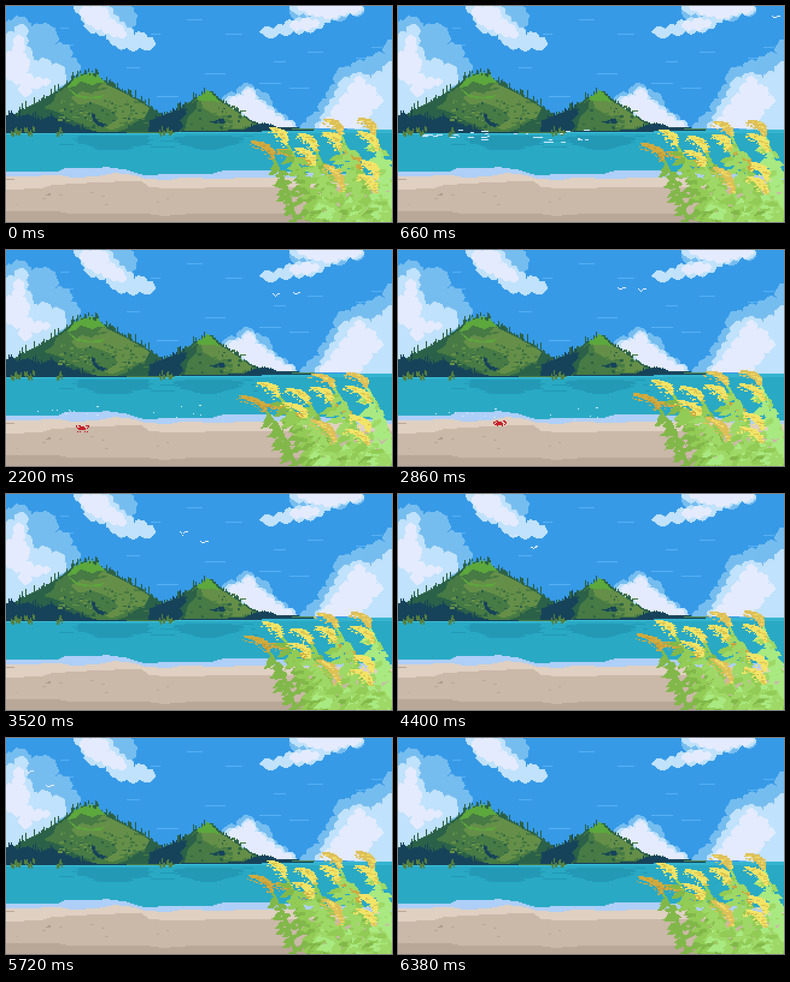
Animation, 640 px wide and 360 px high, one loop 6.6 s. Source, as an HTML page with a canvas:

```html
<!DOCTYPE html>
<html lang="en">
<head>
<meta charset="utf-8">
<title>Island beach</title>
<style>
  html, body { margin: 0; height: 100%; overflow: hidden; background: #369ae7; }
  canvas { display: block; width: 640px; height: 360px; image-rendering: pixelated; }
</style>
</head>
<body>
<canvas id="stage" width="320" height="180"></canvas>
<script>
const STEP = 220, STEPS = 30;
const stage = document.getElementById('stage').getContext('2d');
const backdrop = document.createElement('canvas');
backdrop.width = 320; backdrop.height = 180;
let ctx = backdrop.getContext('2d');

let seed = 1;
const rnd = (a = 0, b = 1) => {
  seed = (seed * 16807) % 2147483647;
  return a + (b - a) * seed / 2147483647;
};
const mix = (a, b, t) => a + (b - a) * t;
const parse = s => s.split(' ').map(p => p.split(',').map(Number));

// Coordinates are stage pixels; everything snaps to 2px cells.
function rect(color, x, y, w = 2, h = 2) {
  ctx.fillStyle = color;
  ctx.fillRect(Math.round(x / 2), Math.round(y / 2), Math.max(1, Math.round(w / 2)), Math.max(1, Math.round(h / 2)));
}

function fill(color, points) {
  const p = typeof points === 'string' ? parse(points) : points;
  const ys = p.map(q => q[1]);
  ctx.fillStyle = color;
  for (let row = Math.floor(Math.min(...ys) / 2); row <= Math.max(...ys) / 2; row++) {
    const y = row * 2 + 1, hits = [];
    p.forEach(([x0, y0], i) => {
      const [x1, y1] = p[(i + 1) % p.length];
      if ((y0 <= y) !== (y1 <= y)) hits.push(Math.round(mix(x0, x1, (y - y0) / (y1 - y0)) / 2));
    });
    hits.sort((a, b) => a - b);
    for (let i = 0; i + 1 < hits.length; i += 2) ctx.fillRect(hits[i], row, hits[i + 1] - hits[i], 1);
  }
}

// Clockwise polygon whose edges swell outwards.
function puff(color, points) {
  const p = parse(points), out = [];
  p.forEach(([x0, y0], i) => {
    const [x1, y1] = p[(i + 1) % p.length], dx = x1 - x0, dy = y1 - y0;
    const size = Math.hypot(dx, dy) < 34 ? .28 : 0;
    for (let t = 0; t < 1; t += .2) {
      const b = Math.sin(t * Math.PI) * size;
      out.push([x0 + dx * t + dy * b, y0 + dy * t - dx * b]);
    }
  });
  fill(color, out);
}

// Small trees standing on a ridge line.
function trees(color, ridge, height) {
  const p = parse(ridge);
  for (let i = 0; i + 1 < p.length; i++) {
    const [x0, y0] = p[i], [x1, y1] = p[i + 1];
    for (let x = x0; x < x1; x += 2) {
      const h = height * rnd() ** 3;
      rect(color, x, mix(y0, y1, (x - x0) / (x1 - x0)) - h, 2, h + 3);
    }
  }
}

function speckle(color, count, x0, y0, x1, y1, w, h) {
  for (let i = 0; i < count; i++) rect(color, rnd(x0, x1), rnd(y0, y1), rnd(2, w), rnd(2, h));
}

function drawSky() {
  const mid = '#76bdef', light = '#c0e2fc', white = '#e4ebfe';
  rect('#369ae7', 0, 0, 640, 210);
  parse('90,35 200,102 364,45 420,128 606,67 500,75 470,135 240,45 580,85 82,64 250,150 444,92 300,22 330,112')
    .forEach(([x, y], i) => rect('#57aef0', x, y, 14 + i * 7 % 24));

  puff(mid, '0,28 10,24 24,18 36,26 42,36 58,31 74,34 83,46 82,64 96,64 107,72 108,86 119,94 122,108 100,135 60,180 0,190');
  puff(light, '0,48 14,44 20,32 32,34 34,50 32,66 43,80 41,94 53,92 67,88 75,100 90,98 98,112 90,134 50,170 0,185');
  puff(white, '0,80 10,76 15,66 16,50 25,50 29,62 27,78 35,86 37,104 32,112 46,122 62,122 74,126 60,132 42,136 36,150 27,148 24,130 10,124 0,118');

  puff(mid, '166,0 204,0 213,10 215,24 208,36 212,44 190,46 176,26');
  puff(light, '112,0 170,0 178,14 188,26 200,36 213,48 224,44 234,52 246,58 246,68 222,69 200,70 182,66 172,58 166,48 150,44 134,38 130,28 126,14');
  puff(white, '122,8 140,2 160,2 170,12 168,22 184,30 196,42 198,52 186,50 172,46 158,38 142,32 130,20');

  puff(mid, '474,0 500,0 540,4 590,4 595,10 570,12 540,22 520,24 500,26 478,22');
  puff(light, '470,0 592,0 590,10 570,12 556,16 540,22 528,28 514,38 496,42 476,42 454,46 424,46 421,42 444,38 460,32 476,24 496,24 508,16 494,12 478,10');
  puff(white, '482,0 590,0 584,8 566,10 552,14 540,20 524,16 510,14 496,8');
  puff(white, '470,32 486,26 508,24 520,28 506,36 490,38 474,36');

  puff(mid, '488,204 498,194 508,182 520,176 522,160 532,154 536,140 546,130 548,112 560,102 572,104 580,93 594,92 608,84 628,80 629,64 642,56 642,206');
  puff(light, '512,204 522,192 528,178 536,164 546,152 552,136 556,124 570,120 580,112 592,114 606,122 612,112 624,110 630,98 642,94 642,206');
  puff(white, '520,204 528,192 540,184 542,172 554,164 558,150 568,146 570,132 578,128 582,118 590,120 596,132 606,134 614,142 611,152 624,152 618,166 606,172 602,184 590,192 586,204');

  puff(mid, '358,160 366,148 382,146 390,134 404,130 412,140 424,144 438,156 440,170 452,180 470,194 440,200 370,180');
  puff(light, '362,158 378,152 390,148 394,140 406,136 414,148 418,158 434,166 446,178 462,190 482,202 420,204 380,180');
  puff(white, '370,158 384,152 394,150 398,140 408,142 412,156 424,162 432,172 446,184 460,192 476,202 420,204 390,176');
}

function drawSea() {
  rect('#29a9c4', 0, 206, 640, 90);
  rect('#34b4cf', 240, 206, 400, 5);
  [[105, 250], [270, 400]].forEach(([a, b]) => {
    for (let y = 216; y < 240; y += 2) {
      const inset = Math.abs(y - 222) * 2.4 + rnd(0, 14);
      rect('#2399b6', a + inset, y, b - a - inset * 2);
    }
  });
  speckle('#2399b6', 26, 80, 214, 410, 236, 26, 2);
}

function drawHills() {
  const navy = '#17435a', dark = '#2b6148', mid = '#477a44', light = '#658f48', bright = '#5ca83c';
  const left = '0,188 30,172 60,156 84,142 100,130 112,120 130,114 150,118 162,125 180,135 200,147 220,156 236,167 252,181 264,184';
  const right = '264,184 282,174 298,165 312,153 326,149 334,141 344,151 356,157 372,168 390,182 410,193 430,201';
  fill(mid, left + ' ' + right + ' 430,208 280,211 0,212');
  trees(dark, left, 14);
  trees(dark, right, 12);
  fill(dark, '0,186 30,173 60,157 84,144 78,160 62,170 84,176 104,188 130,200 150,212 0,212');
  fill(dark, '200,204 220,190 228,176 238,168 264,184 256,211 180,211');
  fill(light, '108,152 126,142 142,146 160,128 190,142 216,156 238,170 230,186 214,190 198,198 178,206 162,204 186,188 172,172 146,162 118,164');
  fill(light, '324,158 350,156 374,170 396,186 412,198 388,204 360,202 370,190 344,180 326,170');
  fill(dark, '284,176 300,166 318,156 314,172 302,184 296,208 270,210');
  fill(navy, '0,184 10,176 18,186 36,180 56,190 76,182 94,194 120,202 150,209 150,213 0,213');
  trees(navy, '0,188 20,186 56,191 94,195 130,206', 15);
  fill(navy, '238,192 254,184 272,178 296,170 300,180 288,190 294,200 286,211 236,211');
  trees(navy, '238,194 256,185 280,176 300,170', 14);
  fill(navy, '141,178 147,181 148,188 156,194 170,198 164,203 152,199 144,190');
  fill(navy, '328,189 344,192 356,187 365,190 362,196 344,195');
  fill(bright, '102,136 112,122 130,114 156,119 168,130 154,127 144,132 124,126 114,134');
  fill(bright, '104,138 118,148 140,152 164,148 158,153 136,155 114,150');
  fill(bright, '314,156 328,148 334,139 344,150 354,160 338,157 326,158');
  trees(bright, '108,126 130,115 156,120', 8);
  trees(bright, '318,154 334,141 350,156', 9);
  fill(mid, '126,132 144,138 170,136 162,140 144,142 128,136');
  speckle(mid, 45, 150, 155, 230, 200, 8, 4);
  speckle(mid, 24, 330, 165, 395, 200, 8, 4);
  speckle(light, 30, 84, 152, 140, 196, 6, 4);
  speckle(dark, 30, 85, 160, 225, 206, 6, 4);
  speckle(dark, 18, 300, 168, 400, 206, 6, 4);
  fill(navy, '300,207 340,209 396,205 412,198 432,196 452,202 486,203 510,205 510,207 430,208 410,211 280,211');
  trees(navy, '404,203 424,198 450,203', 9);
  rect('#4c8a57', 474, 204, 38);
  rect(navy, 0, 209, 200, 3);
  rect('#3abed8', 0, 212, 280);
  rect('#3abed8', 280, 210, 160);
  parse('12,214 20,214 34,214 42,213 88,213 258,212 270,212').forEach(([x, y]) => {
    for (let i = -4; i <= 4; i += 2) rect('#56803f', x + i, y - rnd(2, 13), 2, 8);
  });
}

function drawBeach() {
  fill('#dfd0c2', '0,280 90,278 150,276 215,278 235,286 420,282 640,286 640,360 0,360');
  fill('#cab8a8', '0,306 58,304 74,299 110,296 180,293 226,293 236,301 270,305 312,305 340,302 440,303 640,302 640,360 0,360');
  fill('#b9a797', '0,343 90,343 104,346 240,347 260,350 310,346 430,346 640,344 640,360 0,360');
  fill('#aecff8', '0,276 50,276 88,275 96,271 150,271 166,268 200,273 218,279 234,283 262,280 340,280 358,275 420,274 640,284 640,291 420,285 358,288 292,286 270,290 230,288 214,282 180,278 152,284 110,286 88,282 0,285');
  rect('#ae9c8d', 66, 314, 8);
  rect('#ae9c8d', 70, 312, 4);
  rect('#bba899', 0, 288, 14);
  speckle('#bba899', 8, 10, 310, 400, 338, 6, 2);
}

// Linear track through [step, value...] keys.
function track(keys, s) {
  const i = Math.max(1, keys.findIndex(k => k[0] >= s));
  const a = keys[i - 1], b = keys[i];
  return a.map((v, j) => mix(v, b[j], (s - a[0]) / (b[0] - a[0])));
}

const LEAN = [[0, 0], [5, .35], [6, .65], [10, 1], [16, .6], [20, .48], [24, .04], [29, .35]];
const FLIGHT = [[0, 8, 4], [3, 16, 14], [5, 36, 33], [6, 50, 45], [10, 74, 70], [13, 62, 66], [16, 65, 78], [18, 54, 80], [20, 70, 87], [24, 54, 79], [30, 60, 76]];

function drawBirds(s) {
  const [, y1, y2] = track(FLIGHT, s);
  [[548, y1, 0], [574 + (s > 8 ? 8 : 0), y2, 1]].forEach(([x, y, phase]) => {
    const lift = (s + phase) % 2 ? .5 : 1.1;
    x -= 25.6 * (s - 6);
    for (let i = -2; i <= 2; i++) rect('#e4ebfe', x + i * 2, y + 2 - Math.abs(i) * 2 * lift);
    rect('#e4ebfe', x + 5, y - 2 * lift, 3);
  });
}

function drawSparkles(s) {
  if (s < 3 || s > 13) return;
  seed = 77;
  const fade = s < 7 ? Math.min(1, (s - 2) / 4) : Math.max(.12, 1 - (s - 6) / 4.5);
  const drift = (s - 6) * 7.5;
  [[95, 57], [250, 60]].forEach(([cx, spread]) => {
    for (let i = 0; i < 64; i++) {
      const u = rnd(-1, 1), x = cx + u * spread + Math.max(0, drift) * .4;
      const y = 240 + rnd(-11, 9) - u * u * 4 + Math.min(drift, 34);
      const w = rnd(2, 13) * (s > 8 ? .3 : 1);
      if (rnd() < fade) rect('#c9e6fb', x, y, w);
    }
  });
}

function drawCrab(s) {
  if (s < 5 || s > 13) return;
  const red = '#c4202b', x = 70 + 14 * (s - 6), y = 308 - 2.75 * (s - 6), hop = s % 2 * 2;
  rect(red, x - 6, y - 1, 12, 4);
  rect(red, x - 4, y - 3, 8, 2);
  [-1, 1].forEach(d => {
    rect(red, x + d * 8 - 1, y - 2);
    rect(red, x + d * 10 - 1, y - 5 + hop, 2, 4);
    rect(red, x + d * 6 - 1, y - 6 + hop, 4);
    rect(red, x + d * 8 - 1, y + 4 - hop);
    rect(red, x + d * 4 - 1, y + 4);
  });
}

const GREENS = ['#82b84a', '#92cb55', '#9ed866', '#a9e981'];
const PLUMES = [['#d0aa3f', '#bd9a3c'], ['#f2e467', '#dcc552'], ['#dec058', '#efdc66']];
// tip x, tip y, joint x, joint y, root x, plume, green
const PLANTS = [
  [452, 238, 474, 252, 512, 0, 0], [408, 224, 442, 250, 480, 0, 0],
  [485, 252, 512, 268, 536, 0, 1], [438, 201, 464, 226, 518, 1, 1],
  [486, 212, 512, 236, 552, 1, 1], [482, 236, 510, 260, 548, 1, 2],
  [560, 238, 586, 274, 616, 0, 1], [530, 187, 554, 210, 600, 2, 2],
  [528, 209, 552, 234, 584, 1, 2], [586, 185, 610, 210, 648, 2, 3],
  [586, 208, 614, 236, 650, 1, 3], [530, 264, 558, 304, 574, 2, 2],
  [590, 256, 614, 284, 634, 1, 3], [586, 280, 612, 306, 630, 1, 3]
];
const bend = (a, c, b, t) => [0, 1].map(k => mix(mix(a[k], c[k], t), mix(c[k], b[k], t), t));

function drawLeaf(color, [x, y], dir, size, lean) {
  const tx = x + dir * size * (dir > 0 ? 1 - lean * .5 : 1 + lean * .15);
  const ty = y + size * rnd(-.15, .7) + lean * 4;
  fill(color, [[x, y - 3], [mix(x, tx, .55), mix(y, ty, .3) - 4], [tx, ty], [mix(x, tx, .5), mix(y, ty, .6) + 4], [x, y + 4]]);
}

function drawStem(joint, root, tone, lean, leaves) {
  const [jx, jy] = joint, knee = [mix(jx, root, .65), mix(jy, 364, .4)];
  const at = t => bend(joint, knee, [root, 364], t);
  for (let t = 0; t <= 1; t += .015) {
    const [x, y] = at(t);
    rect(GREENS[tone], x - 2, y, mix(4, 7, t), 3);
  }
  for (let i = 0; i < leaves; i++) {
    const t = mix(.16, .98, (i + rnd(0, .6)) / leaves);
    const shade = GREENS[Math.max(0, Math.min(3, tone + (rnd() < .3 ? -1 : 0)))];
    drawLeaf(shade, at(t), i % 3 === 2 ? 1 : -1, rnd(11, 25), lean);
  }
}

function drawPlume(tip, joint, [main, shade], lean) {
  const knee = [mix(joint[0], tip[0], .3) + 3, mix(joint[1], tip[1], .75) - 3];
  for (let u = 0; u <= 1; u += .04) {
    const [x, y] = bend(joint, knee, tip, u), w = 3 + 8 * Math.sin(Math.PI * (.08 + u * .84));
    const a = w * rnd(.5, 1.15), b = w * rnd(.45, 1);
    rect(main, x - a, y, a + b);
    rect(main, x - a * .6, y + 3, a + b * .5);
    if (rnd() < .5) rect(shade, x - rnd(-3, 5), y + 3, rnd(3, 8));
    if (rnd() < .5) rect(main, x - a - rnd(0, 5 + lean * 3), y + rnd(3, 8), rnd(2, 5));
  }
}

function drawGrass(s) {
  const [, lean] = track(LEAN, Math.min(s, 29));
  PLANTS.forEach(([tx, ty, jx, jy, root, plume, tone], i) => {
    seed = 900 + i * 131;
    const joint = [jx - 13 * lean, jy + 14 * lean];
    drawStem(joint, root, tone, lean, Math.round((364 - jy) / 7));
    drawPlume([tx - 21 * lean, ty + 18 * lean], joint, PLUMES[plume], lean);
  });
  for (let i = 0; i < 9; i++) {
    seed = 4000 + i * 77;
    drawStem([510 + i * 15 - 8 * lean, 312 + i * 5 % 14 + 6 * lean], 528 + i * 14, 1 + i * 2 % 3, lean, 6);
  }
}

drawSky();
drawSea();
drawHills();
drawBeach();
ctx = stage;

let shown = -1;
function play() {
  const s = Math.floor(performance.now() / STEP) % STEPS;
  if (s !== shown) {
    shown = s;
    ctx.drawImage(backdrop, 0, 0);
    drawSparkles(s);
    drawCrab(s);
    drawBirds(s);
    drawGrass(s);
  }
  requestAnimationFrame(play);
}
play();
</script>
</body>
</html>
```
